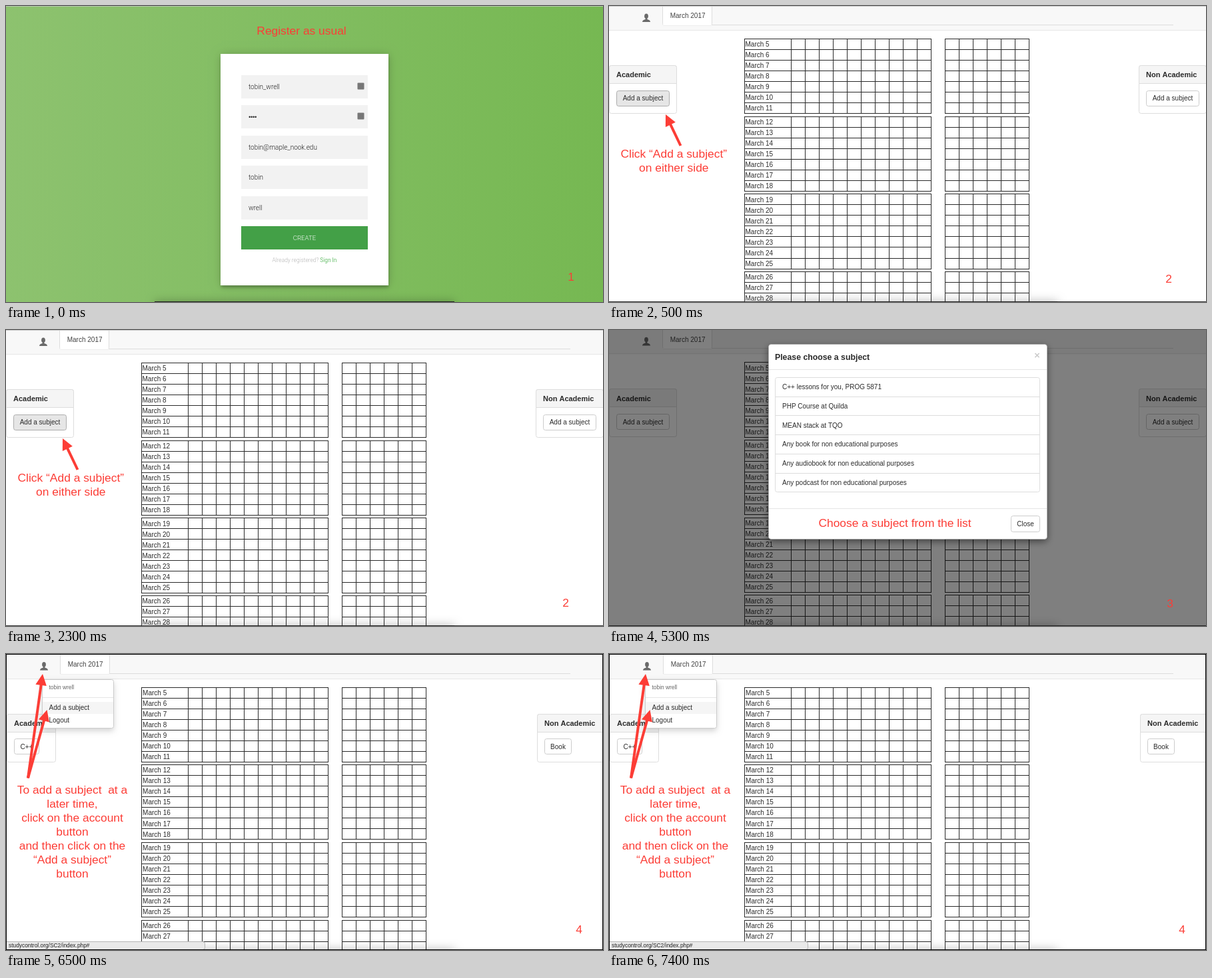
Recreate the animation shown at these times as an HTML page with a canvas. Size 896 by 445 pixels, loop 8000 ms.

```html
<!DOCTYPE html>
<html lang="en">
<head>
<meta charset="utf-8">
<title>Study planner walkthrough</title>
<style>
html, body { margin: 0; width: 100%; height: 100%; overflow: hidden; background: #fff; }
canvas { display: block; }
</style>
</head>
<body>
<canvas id="stage" width="896" height="445"></canvas>
<script>
const ctx = document.getElementById('stage').getContext('2d');
const W = 896, H = 445, LOOP = 8000;
const ROW = 16.03, WEEK = 116.67;
const RED = '#fc3d36', INK = '#2b2b2b', BORDER = '#ddd', GRID = '#2a2a2a';
const SANS = '"Liberation Sans", Arial, sans-serif';
const ROBOTO = 'Roboto, sans-serif';
let dx = 0, dy = 0; // page offset of the current scene

function fill(x, y, w, h, color) {
  ctx.fillStyle = color;
  ctx.fillRect(Math.round(x), Math.round(y), w, h);
}

function box(x, y, w, h, r, color, border) {
  ctx.beginPath();
  ctx.roundRect(Math.round(x) + 0.5, Math.round(y) + 0.5, w - 1, h - 1, r);
  ctx.fillStyle = color;
  ctx.fill();
  if (border) {
    ctx.strokeStyle = border;
    ctx.lineWidth = 1;
    ctx.stroke();
  }
}

function shadowBox(x, y, w, h, r, offset, blur, shade) {
  ctx.save();
  ctx.shadowColor = `rgba(0,0,0,${shade})`;
  ctx.shadowOffsetY = offset;
  ctx.shadowBlur = blur;
  box(x, y, w, h, r, '#fff');
  ctx.restore();
}

// y is the middle of the capital letters
function text(str, x, y, { size = 10, color = INK, weight = 400, align = 'left', family = SANS } = {}) {
  ctx.font = `${weight} ${size}px ${family}`;
  ctx.textAlign = align;
  ctx.fillStyle = color;
  ctx.fillText(str, x, y + size * 0.36);
}

function note(lines, x, y) {
  lines.forEach((line, i) => text(line, x, y + i * 21, { size: 17.4, color: RED, align: 'center' }));
}

function arrow(x0, y0, x1, y1) {
  const length = 17, half = 8.3;
  const reach = Math.hypot(x1 - x0, y1 - y0);
  ctx.save();
  ctx.translate(x0, y0);
  ctx.rotate(Math.atan2(y1 - y0, x1 - x0));
  ctx.fillStyle = RED;
  ctx.fillRect(0, -2, reach - length + 1, 4);
  ctx.beginPath();
  ctx.moveTo(reach, 0);
  ctx.lineTo(reach - length, -half);
  ctx.lineTo(reach - length, half);
  ctx.fill();
  ctx.restore();
}

function button(label, x, y, w, h = 24, pressed = false) {
  box(x, y, w, h, 3, pressed ? '#e6e6e6' : '#fff', pressed ? '#adadad' : '#ccc');
  text(label, x + w / 2, y + h / 2, { align: 'center' });
}

function panel(title, label, x, w, buttonWidth, pressed) {
  const y = 89 + dy;
  box(x, y, w, 73, 3, '#fff', BORDER);
  box(x, y, w, 28, [3, 3, 0, 0], '#f5f5f5', BORDER);
  text(title, x + 11, y + 14.2, { size: 11, weight: 700 });
  button(label, x + 11, y + 37.5, buttonWidth, 24, pressed);
}

function gridLines(columns, top) {
  const left = columns[0], right = columns[columns.length - 1];
  const height = Math.round(top + 7 * ROW) - Math.round(top) + 1;
  for (let r = 0; r <= 7; r++) fill(left, top + r * ROW, right - left + 1, 1, GRID);
  columns.forEach(x => fill(x, top, 1, height, GRID));
}

function calendar() {
  const steps = (start, count) => Array.from({ length: count }, (_, i) => start + 21 * i);
  const academic = [203, ...steps(273, 11)], other = steps(504, 7);
  for (let week = 0; week < 4; week++) {
    const top = 49 + dy + week * WEEK;
    gridLines(academic, top);
    gridLines(other, top);
    for (let d = 0; d < 7; d++) {
      text('March ' + (5 + week * 7 + d), 204.5 + dx * 0.6, top + 8.6 + d * ROW);
    }
  }
}

function userIcon(x, y) {
  ctx.fillStyle = '#6a6a6a';
  ctx.beginPath();
  ctx.ellipse(x, y - 2.8, 2.9, 3.8, 0, 0, Math.PI * 2);
  ctx.fill();
  ctx.fillRect(x - 1.3, y, 2.6, 3);
  ctx.beginPath();
  ctx.moveTo(x - 6, y + 6);
  ctx.quadraticCurveTo(x - 6, y + 3.2, x - 1.3, y + 2);
  ctx.lineTo(x + 1.3, y + 2);
  ctx.quadraticCurveTo(x + 6, y + 3.2, x + 6, y + 6);
  ctx.fill();
}

function page(offsetX, offsetY) {
  dx = offsetX;
  dy = offsetY;
  fill(0, 0, W, H, '#fff');
  fill(0, 0, W, 37 + dy, '#f8f8f8');
  fill(0, 36 + dy, W, 1, '#e7e7e7');
  fill(81, 28 + dy, 766, 1, BORDER);
  box(80 + dx, -4, 75, 34 + Math.round(dy), 3, '#fff', BORDER);
  fill(81 + dx, 28 + dy, 73, 2, '#fff');
  fill(81 + dx, 29 + dy, 73, 1, '#eee');
  text('March 2017', 91.7 + dx, 14.7 + dy, { color: '#444' });
  userIcon(56 + dx, 18 + dy);
  calendar();
}

// soft shade rising from below the bottom edge
function dockShade() {
  ctx.save();
  ctx.shadowColor = 'rgba(0,0,0,0.3)';
  ctx.shadowBlur = 14;
  fill(223, 444, 450, 8, '#222');
  ctx.restore();
}

function registerScene() {
  const sky = ctx.createLinearGradient(0, 0, W, 0);
  sky.addColorStop(0, '#8dc26f');
  sky.addColorStop(1, '#76b852');
  fill(0, 0, W, H, sky);
  fill(0, 0, W, 1, '#b9c9b0');
  dockShade();
  shadowBox(322, 72, 252, 348, 0, 0, 14, 0.2);
  shadowBox(322, 72, 252, 348, 0, 3.5, 4, 0.24);
  fill(322, 72, 252, 348, '#fff');

  const values = ['tobin_wrell', '', 'tobin@maple_nook.edu', 'tobin', 'wrell'];
  values.forEach((value, i) => {
    const y = 104 + i * 45.4;
    fill(353, y, 190, 35, '#f2f2f2');
    text(value, 364, y + 17.5, { family: ROBOTO, weight: 300, color: '#222' });
    if (i < 2) box(527, y + 10.5, 11, 11, 1, '#777');
  });
  for (let i = 0; i < 4; i++) {
    ctx.beginPath();
    ctx.arc(365.7 + i * 3, 166.8, 1.2, 0, Math.PI * 2);
    ctx.fillStyle = '#222';
    ctx.fill();
  }
  fill(353, 331, 190, 35, '#43a047');
  text('CREATE', 448, 349, { family: ROBOTO, size: 9.7, weight: 300, color: '#fff', align: 'center' });
  const small = { family: ROBOTO, size: 8.4, weight: 300 };
  text('Already registered?', 399.5, 382, { ...small, color: '#b3b3b3' });
  text('Sign In', 496.5, 382, { ...small, weight: 400, color: '#6abf6d', align: 'right' });
  note(['Register as usual'], 443.5, 36.8);
  note(['1'], 848, 407);
}

function sidesScene() {
  page(0, 0);
  panel('Academic', 'Add a subject', 0, 102, 80, true);
  panel('Non Academic', 'Add a subject', 795, 102, 80);
  fill(0, 0, W, 1, '#ccc');
  fill(0, 444, W, 1, '#333');
  dockShade();
  arrow(107.5, 210, 85, 163);
  note(['Click “Add a subject”', 'on either side'], 97.3, 221.3);
  note(['2'], 840, 410);
}

function chooseScene() {
  page(0, -0.6);
  panel('Academic', 'Add a subject', 0, 102, 80);
  panel('Non Academic', 'Add a subject', 795, 102, 80);
  fill(0, 0, W, H, 'rgba(0,0,0,0.5)');
  fill(0, 444, W, 1, '#222');
  dockShade();

  shadowBox(239, 21, 419, 294, 4, 3.5, 10.5, 0.5);
  box(239, 21, 419, 294, 4, '#fff', 'rgba(0,0,0,0.2)');
  text('Please choose a subject', 249, 41, { size: 12.3, weight: 700 });
  text('×', 642.5, 38, { size: 14.6, weight: 700, color: '#ccc', align: 'center' });
  fill(240, 59, 417, 1, '#e5e5e5');
  fill(240, 268, 417, 1, '#e5e5e5');

  box(249, 71, 398, 173, 3, '#fff', BORDER);
  const subjects = [
    'C++ lessons for you, PROG 5871',
    'PHP Course at Quilda',
    'MEAN stack at TQO',
    'Any book for non educational purposes',
    'Any audiobook for non educational purposes',
    'Any podcast for non educational purposes'
  ];
  subjects.forEach((subject, i) => {
    if (i) fill(249, 71 + i * 28.7, 398, 1, BORDER);
    text(subject, 260, 85.7 + i * 28.7);
  });
  button('Close', 603, 279, 44, 25);
  note(['Choose a subject from the list'], 429, 289.6);
  note(['3'], 842, 411);
}

function accountScene() {
  page(1, 0.5);
  panel('Academic', 'C++', 1, 74, 38);
  panel('Non Academic', 'Book', 797, 102, 41);

  shadowBox(54, 38, 108, 74, 3, 4, 8, 0.18);
  box(54, 38, 108, 74, 3, '#fff', '#ccc');
  text('tobin wrell', 64.5, 50, { size: 8.4, color: '#666' });
  fill(55, 65, 106, 1, '#e5e5e5');
  fill(55, 72, 106, 18, '#f5f5f5');
  text('Add a subject', 64.5, 80.6);
  text('Logout', 64.5, 99);

  dockShade();
  box(-3, 432, 302, 13, 3, '#e9e9e9', '#b5b5b5');
  text('studycontrol.org/SC2/index.php#', 4, 438.3, { size: 8.4, color: '#222' });
  ctx.strokeStyle = '#000';
  ctx.lineWidth = 1;
  ctx.strokeRect(0.5, 0.5, W - 1, H - 1);

  arrow(33, 186.5, 55, 30);
  arrow(33, 186.5, 61.5, 84);
  note(['To add a subject  at a', 'later time,', 'click on the account', 'button',
    'and then click on the', '“Add a subject”', 'button'], 99.5, 203.4);
  note(['4'], 860, 414);
}

const scenes = [[500, registerScene], [3500, sidesScene], [6500, chooseScene], [LOOP, accountScene]];

function draw() {
  const time = performance.now() % LOOP;
  scenes.find(([end]) => time < end)[1]();
  requestAnimationFrame(draw);
}
draw();
</script>
</body>
</html>
```
